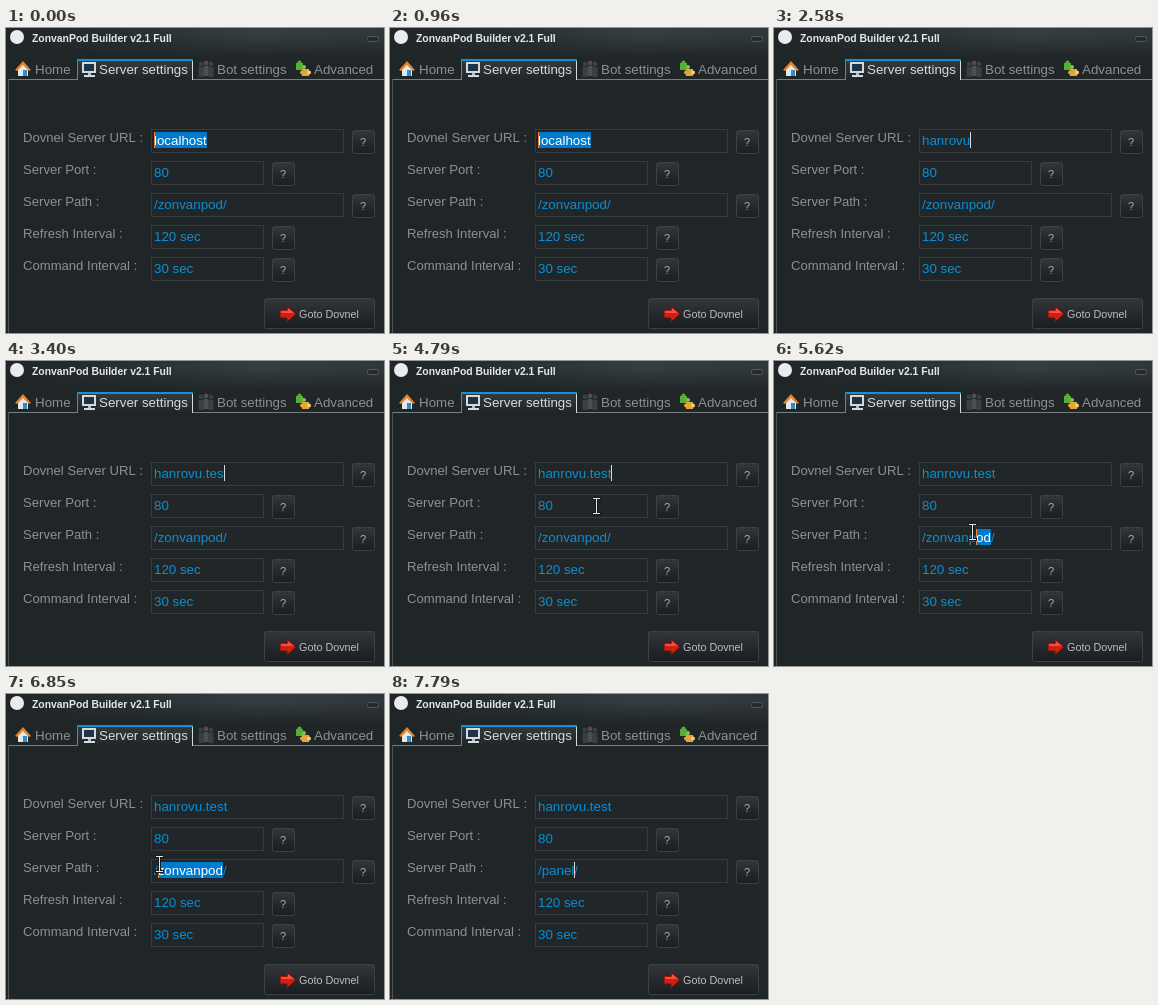
An HTML page with a canvas that plays this animation: 378 px wide and 305 px high, repeating every 8000 ms.

```html
<!DOCTYPE html>
<html lang="en">
<head>
<meta charset="utf-8">
<title>Server settings</title>
<style>
html, body { margin: 0; width: 100%; height: 100%; overflow: hidden; background: #202527; }
canvas { display: block; }
</style>
</head>
<body>
<canvas id="stage" width="378" height="305"></canvas>
<script>
const c = document.getElementById('stage').getContext('2d');
const LOOP = 8000;
const SANS = '"Liberation Sans", Arial, sans-serif';
const BODY = '13.333px ' + SANS;
const BLUE = '#0c8fd2', MARK = '#007acc', LABEL = '#8b9193', PANEL = '#202527';
const TEXT_X = 148;

const URL_TEXT = 'hanrovu.test';
const URL_KEYS = [1090, 1220, 1620, 1750, 2150, 2290, 2580, 2720, 3000, 3130, 3400, 3690];
const OLD_PATH = '/zonvanpod/';
const PATH_TEXT = 'panel';
const PATH_KEYS = [7250, 7390, 7520, 7650, 7790];

// time, x, y of the pointer
const POINTER = [
  [4530, 74, 207], [4660, 140, 176], [4790, 206, 145], [4910, 211, 151],
  [5050, 214, 160], [5190, 216, 167], [5330, 217, 171], [5620, 198, 171],
  [5750, 176, 171], [5880, 157, 170], [6010, 144, 170], [6300, 149, 170], [6420, 153, 170]
];

const count = (keys, t) => keys.filter(k => k <= t).length;

function rect(x, y, w, h, fill) {
  c.fillStyle = fill;
  c.fillRect(x, y, w, h);
}

function frame(x, y, w, h, color) {
  c.strokeStyle = color;
  c.lineWidth = 1;
  c.strokeRect(x + .5, y + .5, w - 1, h - 1);
}

function poly(points, fill, stroke) {
  c.beginPath();
  for (let i = 0; i < points.length; i += 2) c.lineTo(points[i], points[i + 1]);
  c.closePath();
  c.fillStyle = fill;
  c.fill();
  if (stroke) {
    c.strokeStyle = stroke;
    c.lineWidth = 1;
    c.stroke();
  }
}

function disc(x, y, r, fill) {
  c.beginPath();
  c.arc(x, y, r, 0, 7);
  c.fillStyle = fill;
  c.fill();
}

function text(s, x, y, color, font = BODY) {
  c.font = font;
  c.fillStyle = color;
  c.fillText(s, x, y);
}

function blend(x0, y0, x1, y1, ...colors) {
  const g = c.createLinearGradient(x0, y0, x1, y1);
  colors.forEach((color, i) => g.addColorStop(i / (colors.length - 1), color));
  return g;
}

function width(s) {
  c.font = BODY;
  return c.measureText(s).width;
}

function button(x, y, w, h) {
  c.beginPath();
  c.roundRect(x + .5, y + .5, w - 1, h - 1, 2);
  c.fillStyle = blend(0, y, 0, y + h, '#34383a', '#25292b', '#1b1e20');
  c.fill();
  c.strokeStyle = '#3d4143';
  c.lineWidth = 1;
  c.stroke();
}

function titleBar() {
  rect(0, 0, 378, 30, blend(0, 0, 378, 0, '#1f2528', '#283034', '#353d41', '#30373a'));
  rect(0, 0, 378, 30, blend(0, 8, 0, 30, '#20252700', PANEL));
  disc(11, 9, 7, '#e9ecee');
  text('ZonvanPod Builder v2.1 Full', 26, 14, '#e4e8e9', 'bold 10.4px ' + SANS);
  c.beginPath();
  c.roundRect(361.5, 8.5, 11, 5, 2);
  c.fillStyle = '#24292b';
  c.fill();
  c.strokeStyle = '#565c5f';
  c.stroke();
}

function tabs() {
  rect(2, 51, 376, 1, '#777d80');
  rect(2, 51, 1, 254, '#4c5255');
  rect(71, 31, 116, 21, blend(0, 31, 0, 52, '#343b3f', PANEL));
  rect(71, 31, 1, 21, '#777d80');
  rect(186, 31, 1, 21, '#d5d9da');
  rect(71, 31, 116, 2, '#1791d6');
  text('Home', 29, 46, LABEL);
  text('Server settings', 93, 46, '#d6dadc');
  text('Bot settings', 211, 46, LABEL);
  text('Advanced', 308, 46, LABEL);

  // house
  poly([12, 41, 17, 36, 22, 41, 22, 48, 12, 48], '#dfe8f0');
  poly([9, 42, 17, 33, 25, 42, 23, 43, 17, 37, 11, 43], '#e58427');
  rect(17, 42, 4, 6, '#3489cc');

  // monitor
  rect(76, 34, 14, 11, '#d3d9dc');
  rect(78, 36, 10, 7, '#1c3446');
  rect(82, 45, 3, 2, '#b5bcc0');
  rect(78, 47, 11, 2, '#d3d9dc');

  // people
  for (const [x, y, color] of [[195, 36, '#3a3f42'], [205, 36, '#3a3f42'], [200, 35, '#4a4f52']]) {
    disc(x, y, 2.4, color);
    rect(x - 2.5, y + 3, 5, 10, color);
  }

  // puzzle pieces
  rect(290, 35, 7, 7, '#58ad39');
  disc(293.5, 34.5, 2, '#58ad39');
  disc(298, 39, 2, '#7cc653');
  rect(296, 41, 7, 7, '#e3a53a');
  disc(296, 44.5, 2, '#e3a53a');
  disc(303, 44.5, 2, '#f1d274');
}

function form() {
  const labels = ['Dovnel Server URL :', 'Server Port :', 'Server Path :', 'Refresh Interval :', 'Command Interval :'];
  labels.forEach((label, i) => {
    const y = 101 + 32 * i;
    const long = i === 0 || i === 2;
    const w = long ? 193 : 113;
    text(label, 17, y + 13, LABEL, '13.1px ' + SANS);
    rect(145, y, w, 24, '#212628');
    frame(145, y, w, 24, '#363b3d');
    const bx = long ? 346 : 266;
    button(bx, y + 1, 23, 24);
    text('?', bx + 8, y + 17, '#a9aeb0', '11px ' + SANS);
  });
  text('80', TEXT_X, 149, BLUE);
  text('120 sec', TEXT_X, 213, BLUE);
  text('30 sec', TEXT_X, 245, BLUE);

  button(258, 270, 111, 31);
  poly([274, 282, 281, 282, 281, 278, 290, 286, 281, 294, 281, 290, 274, 290], '#d02014', '#6e120c');
  poly([275, 283, 282, 283, 282, 280, 288, 285, 275, 285], '#ec5538');
  text('Goto Dovnel', 293, 290, '#b9bec0', '10.8px ' + SANS);
}

// Text with an optional marked range and caret, both given as character positions
function entry(s, top, from, to, caret) {
  const at = i => TEXT_X + width(s.slice(0, i));
  text(s, TEXT_X, top + 13, BLUE);
  if (to > from) {
    const x = Math.round(at(from)), w = Math.round(at(to)) - x;
    rect(x, top, w, 16, MARK);
    c.save();
    c.beginPath();
    c.rect(x, top, w, 16);
    c.clip();
    text(s, TEXT_X, top + 13, '#fff');
    c.restore();
  }
  if (caret >= 0) {
    c.globalCompositeOperation = 'difference';
    rect(Math.round(at(caret)), top, 1, 16, '#fff');
    c.globalCompositeOperation = 'source-over';
  }
}

function urlEntry(t) {
  const n = count(URL_KEYS, t);
  const off = (t >= 430 && t < 960) || (t >= 4250 && t < 4780) || t >= 5330;
  const s = n ? URL_TEXT.slice(0, n) : 'localhost';
  entry(s, 104, 0, n ? 0 : s.length, off ? -1 : n);
}

function pathEntry(t, pointer) {
  const n = count(PATH_KEYS, t);
  if (n) return entry('/' + PATH_TEXT.slice(0, n) + '/', 168, 0, 0, n + 1);
  const end = OLD_PATH.length - 1;
  if (t < 5330) return entry(OLD_PATH, 168, 0, 0, -1);
  let start = end;
  if (t >= 5620) {
    start = 0;
    while (start < end && TEXT_X + width(OLD_PATH.slice(0, start)) < pointer[1] - 3) start++;
  }
  entry(OLD_PATH, 168, start, end, t >= 6700 && t < 6850 ? -1 : start);
}

function arrow(x, y) {
  poly([x, y, x, y + 16, x + 4, y + 12, x + 7, y + 18, x + 9, y + 17, x + 6, y + 11, x + 11, y + 11], '#fff', '#111');
}

function beam(x, y) {
  for (const [grow, color] of [[1, '#17191a'], [0, '#e2e5e6']]) {
    rect(x - grow, y - 7 - grow, 1 + 2 * grow, 15 + 2 * grow, color);
    for (const end of [y - 8, y + 7]) rect(x - 3 - grow, end - grow, 7 + 2 * grow, 1 + 2 * grow, color);
  }
}

function draw(t) {
  rect(0, 0, 378, 305, PANEL);
  titleBar();
  tabs();
  form();
  const pointer = POINTER[count(POINTER.map(p => p[0]), t) - 1];
  urlEntry(t);
  pathEntry(t, pointer);
  if (pointer && t < PATH_KEYS[0]) {
    const [time, x, y] = pointer;
    (time < 4790 ? arrow : beam)(x, y);
  }
}

const begin = performance.now();
function tick() {
  draw((performance.now() - begin) % LOOP);
  requestAnimationFrame(tick);
}
tick();
</script>
</body>
</html>
```
